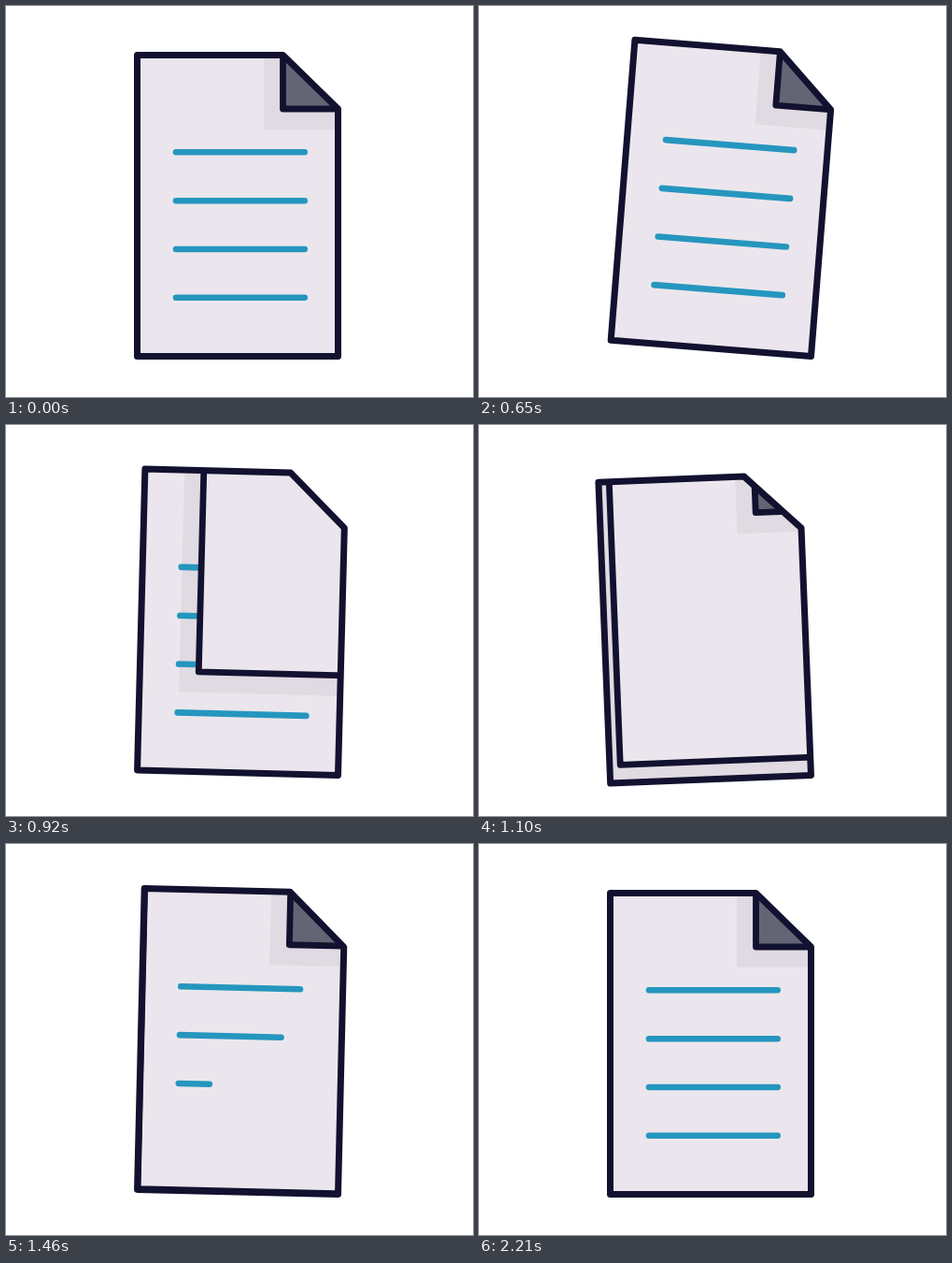
Recreate the animation shown at these times as an HTML page with a canvas. Size 500 px wide and 418 px high, loop 2930 ms.

```html
<!DOCTYPE html>
<html lang="en">
<head>
<meta charset="utf-8">
<title>Page turn</title>
<style>
  html, body { margin: 0; width: 100%; height: 100%; overflow: hidden; background: #fff; }
  canvas { display: block; }
</style>
</head>
<body>
<canvas id="stage" width="500" height="418"></canvas>
<script>
const ctx = document.getElementById('stage').getContext('2d');

const LOOP = 2930, START = 530, STEP = 30, LAST_STEP = 56;
const INK = '#12112f', BLUE = '#2596be', SHADE = '#e0dae2';
const PAPER = [235, 230, 237], DARK = [99, 101, 117];

const LEFT = 140.5, RIGHT = 355.5, TOP = 52.5, BOTTOM = 374.5;
const FOLD = { x: 296.5, y: 110 };
const LINE_YS = [156.3, 208.2, 260, 311.8];

// Step, angle in degrees
const SWING = [[-3.5, 0], [9, 7], [16.5, -3], [26.5, 2], [38.2, 0]];

const clamp = v => Math.min(1, Math.max(0, v));
const mix = (a, b, p) => a + (b - a) * p;
const rgb = (a, b, p) => `rgb(${a.map((v, i) => Math.round(mix(v, b[i], p))).join()})`;

// Quick start with a long settling tail
function settle(step, begin, length = 24) {
  const hill = v => v ** 2.2 / (v ** 2.2 + 3.4 ** 2.2);
  const s = Math.min(length, Math.max(0, step - begin));
  return hill(s) / hill(length);
}

function swingAngle(step) {
  if (step < 0) return 0;
  for (let i = 1; i < SWING.length; i++) {
    const [s0, a0] = SWING[i - 1], [s1, a1] = SWING[i];
    if (step < s1) {
      const p = (step - s0) / (s1 - s0);
      return mix(a0, a1, (1 - Math.cos(Math.PI * p)) / 2);
    }
  }
  return 0;
}

function pagePath() {
  ctx.beginPath();
  ctx.moveTo(LEFT, TOP);
  ctx.lineTo(FOLD.x, TOP);
  ctx.lineTo(RIGHT, FOLD.y);
  ctx.lineTo(RIGHT, BOTTOM);
  ctx.lineTo(LEFT, BOTTOM);
  ctx.closePath();
}

function stroke(color, width) {
  ctx.strokeStyle = color;
  ctx.lineWidth = width;
  ctx.stroke();
}

function textLine(y, amount) {
  if (amount <= 0) return;
  ctx.beginPath();
  ctx.moveTo(182, y);
  ctx.lineTo(182 + 137.7 * amount, y);
  stroke(BLUE, 6.6);
}

// The fold corner travels along the line from its resting place to the bottom left
const foldCorner = p => ({ x: mix(FOLD.x, LEFT, p), y: mix(FOLD.y, BOTTOM, p) });

function shadow({ x, y }) {
  ctx.fillStyle = SHADE;
  ctx.fillRect(x - 20.5, 0, 500, y + 22);
}

function flap({ x, y }, color) {
  ctx.fillStyle = color;
  ctx.fillRect(x, 0, 500, y);
  ctx.beginPath();
  ctx.moveTo(x, 0);
  ctx.lineTo(x, y);
  ctx.lineTo(500, y);
  stroke(INK, 6.8);
}

function draw(step) {
  ctx.fillStyle = '#fff';
  ctx.fillRect(0, 0, 500, 418);
  ctx.lineCap = ctx.lineJoin = 'round';

  ctx.save();
  ctx.translate(RIGHT, BOTTOM);
  ctx.rotate(swingAngle(step) * Math.PI / 180);
  ctx.translate(-RIGHT, -BOTTOM);

  ctx.save();
  pagePath();
  ctx.clip();
  ctx.fillStyle = rgb(PAPER, PAPER, 0);
  ctx.fillRect(0, 0, 500, 418);

  const turn = settle(step, 9);
  const turning = foldCorner(turn);
  shadow(turning);
  LINE_YS.forEach(y => textLine(y, 1));
  flap(turning, rgb(DARK, PAPER, clamp(turn / 0.3)));

  LINE_YS.forEach((y, i) => textLine(y, settle(step, 21 + 4 * i, 23)));

  const refold = settle(step, 14);
  if (refold > 0) {
    const next = foldCorner(-0.24 * (1 - refold));
    shadow(next);
    flap(next, rgb(DARK, DARK, 0));
  }
  ctx.restore();

  pagePath();
  stroke(INK, 7);
  ctx.restore();
}

function tick(now) {
  const t = now % LOOP;
  draw(Math.min(LAST_STEP, Math.floor((t - START) / STEP)));
  requestAnimationFrame(tick);
}

const begin = performance.now();
draw(-1);
requestAnimationFrame(function frame() {
  tick(Math.max(0, performance.now() - begin));
});
</script>
</body>
</html>
```
